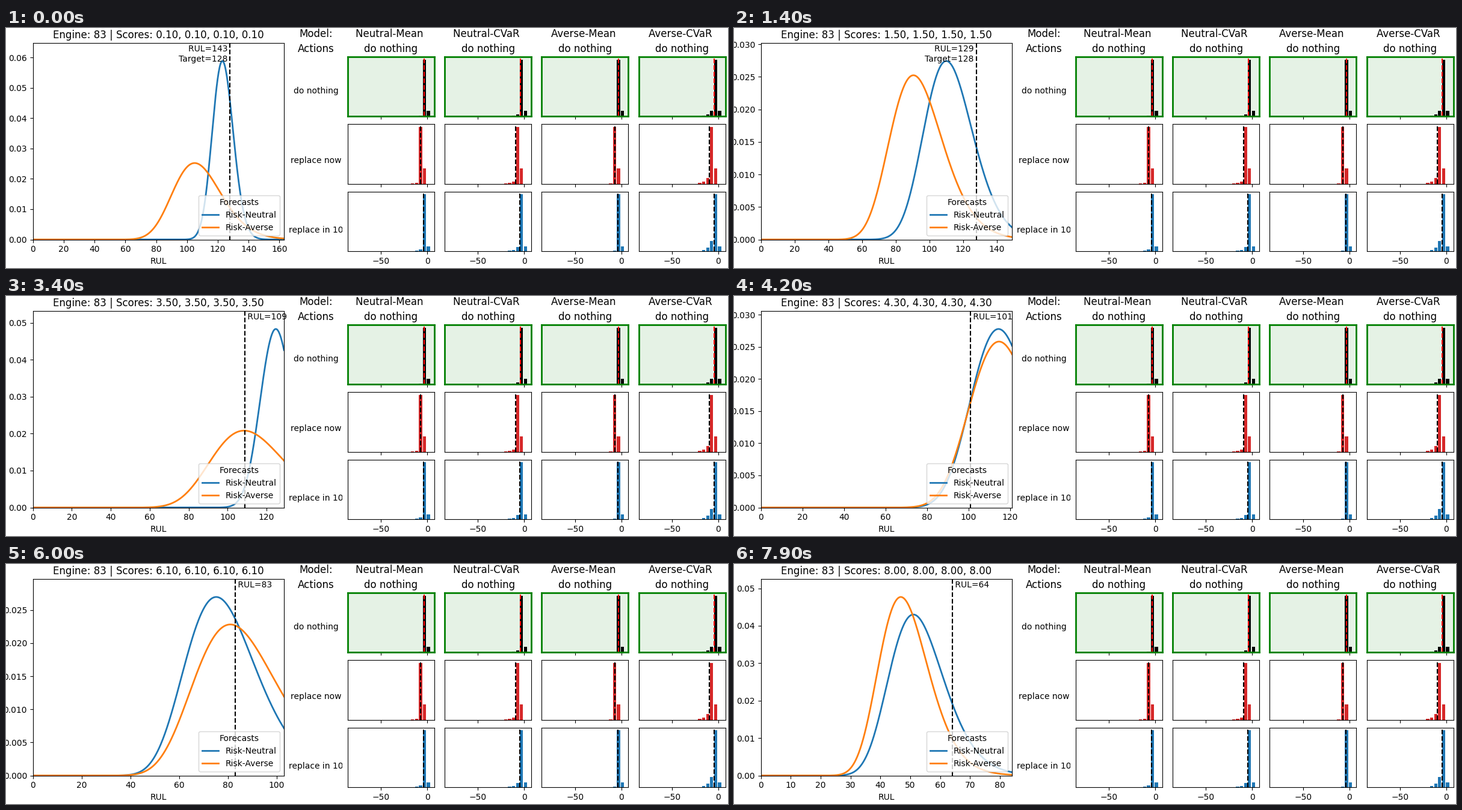
Recreate the animation shown at these times as a matplotlib script. Size 1200 by 400 pixels, loop 8000 ms.

```python
import numpy as np
import matplotlib.pyplot as plt
from matplotlib.animation import FuncAnimation
from matplotlib.transforms import Bbox

W, H, DPI = 1200, 400, 100
FRAMES, INTERVAL = 80, 100
START_RUL, TARGET = 143, 128
BIN, LAST_EDGE = 4.25, 3.4

plt.rcParams["font.family"] = "DejaVu Sans"

# Log-normal forecasts drift between (mode, spread) waypoints
WAYPOINTS = [0, 14, 23, 34, 50, 60, 79]
FORECASTS = {
    "Risk-Neutral": [(123, .055), (110, .131), (94.2, .148), (124.8, .066),
                     (104.2, .183), (75.2, .193), (51, .179)],
    "Risk-Averse": [(105, .149), (90.5, .172), (85.8, .166), (108.5, .174),
                    (121, .093), (81, .211), (46.8, .176)],
}

# Model: expected cost of doing nothing, weight of the cost tail
MODELS = {
    "Neutral-Mean": (-3.4, .02),
    "Neutral-CVaR": (-4.2, .045),
    "Averse-Mean": (-3.3, .006),
    "Averse-CVaR": (-4.4, .105),
}

# Action: bar colour, line colour, peak bin, shoulder, cost scale, tail scale
ACTIONS = {
    "do nothing": ("black", "red", 1, .1, 1, .9),
    "replace now": ("tab:red", "black", 2, .275, 2.15, 1),
    "replace in 10": ("tab:blue", "black", 1, .088, 1.07, 1.7),
}

fig = plt.figure(figsize=(W / DPI, H / DPI), dpi=DPI, facecolor="white")


def add_axes(left, top, width, height):
    return fig.add_axes([left / W, 1 - (top + height) / H, width / W, height / H])


def label(x, baseline, text, **kw):
    return fig.text(x / W, 1 - baseline / H, text, ha="center", va="baseline", **kw)


def density(x, mode, spread):
    peak = np.exp(-spread ** 2 / 2) / (spread * mode * np.sqrt(2 * np.pi))
    return peak * np.exp(-np.log(x / mode) ** 2 / (2 * spread ** 2)), peak


def draw_costs(ax, action, model):
    bar_color, line_color, peak_bin, shoulder, cost_scale, tail_scale = action
    cost, tail = model
    # Bins run from the highest value down; the tail decays geometrically
    bins = np.arange(peak_bin - 1, peak_bin + 4)
    heights = [shoulder, 1] + [tail * tail_scale * .37 ** k for k in range(3)]
    ax.bar(LAST_EDGE - BIN * (bins + 0.5), heights, width=0.82 * BIN, color=bar_color)
    ax.axvline(cost * cost_scale, color=line_color, ls="--", lw=1.5)
    ax.set(xlim=(LAST_EDGE - 21 * BIN, LAST_EDGE + BIN), ylim=(0, 1.05),
           xticks=[-50, 0], yticks=[])


def highlight(ax):
    ax.set_facecolor("#e5f2e5")
    for spine in ax.spines.values():
        spine.set(color="green", linewidth=2)


# Action grid
label(515.3, 39.6, "Model:\nActions", size=12, linespacing=1.5)
label_area = Bbox([[465, 0], [559, H]])
for row, (name, action) in enumerate(ACTIONS.items()):
    text = label(515.3, 109 + 116 * row, name, size=10, clip_on=True)
    text.set_clip_box(label_area)
    for col, (model_name, model) in enumerate(MODELS.items()):
        ax = add_axes(567.8 + 161.3 * col, 47.9 + 112.4 * row, 144, 99.5)
        draw_costs(ax, action, model)
        if row == 0:
            highlight(ax)
            ax.set_title(f"{model_name} \ndo nothing", linespacing=1.5)
        if row < len(ACTIONS) - 1:
            ax.tick_params(labelbottom=False)

# Forecast plot
main = add_axes(44.8, 25.2, 417.2, 327.3)
main.set_xlabel("RUL")
curves = {name: main.plot([], [], lw=2, label=name)[0] for name in FORECASTS}
marker = main.axvline(TARGET, color="black", ls="--", lw=1.5)
note = main.text(0, 0.99, "", va="top", transform=main.get_xaxis_transform())
main.legend(title="Forecasts", loc="lower right")


def update(cycle):
    rul = START_RUL - cycle
    x = np.linspace(0.1, rul + 20, 500)
    peaks = []
    for name, points in FORECASTS.items():
        mode, spread = (np.interp(cycle, WAYPOINTS, p) for p in zip(*points))
        y, peak = density(x, mode, spread)
        curves[name].set_data(x, y)
        peaks.append(peak)
    main.set(xlim=(0, rul + 20), ylim=(0, 1.1 * max(peaks)))

    at = min(rul, TARGET)
    marker.set_xdata([at, at])
    if rul > TARGET:
        note.set(x=at, ha="right", text=f"RUL={rul} \nTarget={TARGET} ")
    else:
        note.set(x=at, ha="left", text=f" RUL={rul}")

    score = f"{(cycle + 1) / 10:.2f}"
    main.set_title("Engine: 83 | Scores: " + ", ".join([score] * len(MODELS)))
    return [*curves.values(), marker, note, main.title]


anim = FuncAnimation(fig, update, frames=FRAMES, interval=INTERVAL,
                     repeat=True, repeat_delay=0, blit=False)
plt.show()
```
